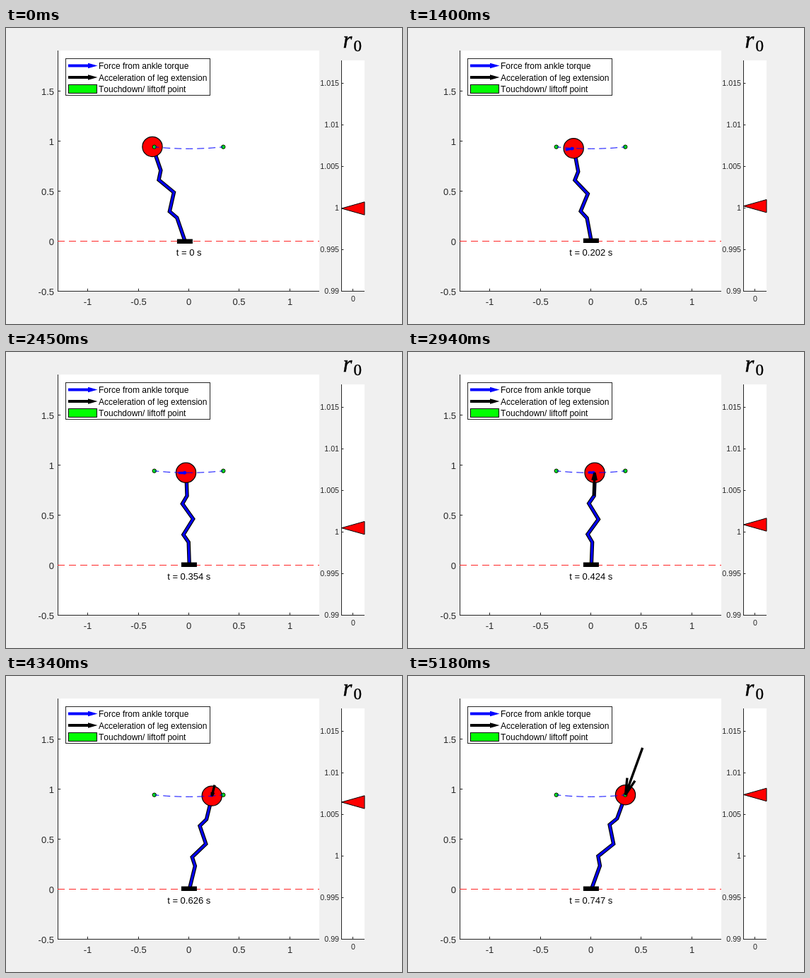
Animation of 560x420 px, one loop 5.25 s. Source, as an HTML page:

```html
<!DOCTYPE html>
<html lang="en">
<head>
<meta charset="utf-8">
<title>Leg stance simulation</title>
<style>
  html, body { margin: 0; width: 100%; height: 100%; overflow: hidden; background: #f0f0f0; }
  svg { display: block; width: 560px; height: 420px; font-family: "Liberation Sans", Arial, sans-serif; font-kerning: none; }
  .axis { stroke: #262626; fill: none; }
  .label { fill: #262626; font-size: 13px; }
  .small { fill: #262626; font-size: 10.67px; }
  .right { text-anchor: end; }
  .mid { text-anchor: middle; }
  .legend { font-size: 12px; }
  .math { font-family: "Liberation Serif", "Times New Roman", serif; stroke: #000; stroke-width: 0.4; }
  .dash { fill: none; stroke-dasharray: 10 6; }
  .arrow { fill: none; stroke-width: 3.4; stroke-linejoin: miter; }
  .leg { fill: none; stroke-linejoin: miter; }
</style>
</head>
<body>
<svg viewBox="0 0 560 420">
  <rect width="560" height="420" fill="#f0f0f0"/>
  <rect x="73" y="32" width="370" height="342" fill="#fff"/>
  <rect x="474" y="46" width="33" height="327" fill="#fff"/>
  <g id="axes"></g>

  <text class="math" x="476.5" y="28" font-size="33" font-style="italic">r</text>
  <text class="math" x="491.5" y="32.5" font-size="23">0</text>

  <path class="dash" d="M73 302.5H443" stroke="#ff2626"/>
  <path class="leg" id="legEdge" stroke="#000" stroke-width="5.4"/>
  <path class="leg" id="legCore" stroke="#00f" stroke-width="3"/>
  <rect id="foot" width="22" height="6.5"/>
  <circle id="mass" r="14.1" fill="#f00" stroke="#000" stroke-width="1.25"/>
  <g fill="#0f0" stroke="#000">
    <circle cx="209.8" cy="168.7" r="2.7"/>
    <circle cx="307.3" cy="168.7" r="2.7"/>
  </g>
  <path class="dash" d="M209.8 168.7Q258.5 173.9 307.3 168.7" stroke="#00f" stroke-dashoffset="3.5"/>
  <path class="arrow" id="force" stroke="#00f"/>
  <path class="arrow" id="accel" stroke="#000"/>
  <text class="mid" id="time" x="258.7" y="323" font-size="13"></text>

  <path id="pointer" fill="#f00" stroke="#000"/>

  <g class="legend">
    <rect x="84.5" y="43.5" width="204" height="52" fill="#fff" stroke="#262626"/>
    <path d="M88 53.5H120" stroke="#00f" stroke-width="4"/>
    <path d="M116 49.8L129.5 53.5L116 57.2Z" fill="#00f"/>
    <path d="M88 70H120" stroke="#000" stroke-width="4"/>
    <path d="M116 66.3L129.5 70L116 73.7Z"/>
    <rect x="88.5" y="80.5" width="40" height="12" fill="#0f0" stroke="#000"/>
    <text x="131" y="58">Force from ankle torque</text>
    <text x="131" y="74.5">Acceleration of leg extension</text>
    <text x="131" y="91">Touchdown/ liftoff point</text>
  </g>
</svg>
<script>
  const STEP = 70, STEPS = 75, GROUND = 302.8, PIVOT = 258.9;
  const $ = id => document.getElementById(id);
  const set = (id, attrs) => {
    for (const name in attrs) $(id).setAttribute(name, attrs[name]);
  };

  function buildAxes() {
    let out = "";
    const line = d => out += `<path class="axis" d="${d}"/>`;
    const text = (cls, x, y, s) => out += `<text class="${cls}" x="${x}" y="${y}">${s}</text>`;
    line("M73.5 32V373.5H443M474.5 46V373.5H507");
    for (let v = -1; v <= 1; v += 0.5) {
      const x = Math.floor(258.5 + v * 142.6) + 0.5;
      line(`M${x} 373V369.8`);
      text("label mid", x, 393, v);
    }
    for (let v = -0.5; v <= 1.5; v += 0.5) {
      const y = Math.floor(302.6 - v * 142.1) + 0.5;
      line(`M73 ${y}H77.2`);
      text("label right", 68, y + 5, v);
    }
    for (let i = 0; i < 6; i++) {
      const y = 373.5 - i * 59;
      line(`M474 ${y}H477.4`);
      text("small right", 471, y + 3.8, +(0.99 + i * 0.005).toFixed(3));
    }
    line("M490.5 373V370");
    text("small mid", 491, 387.5, 0);
    $("axes").innerHTML = out;
  }

  // Linear interpolation through [step, value] pairs.
  function track(k, keys) {
    for (let i = 1; i < keys.length; i++) {
      const [a, va] = keys[i - 1], [b, vb] = keys[i];
      if (k <= b) return va + (vb - va) * (k - a) / (b - a);
    }
    return keys[keys.length - 1][1];
  }

  // Arrow from (x + dx, y + dy) with its tip at (x, y).
  function arrow(x, y, dx, dy) {
    if (Math.hypot(dx, dy) < 0.5) return "";
    const barb = s => `${x + 0.33 * (dx + s * dy)} ${y + 0.33 * (dy - s * dx)}`;
    return `M${x + dx} ${y + dy}L${x} ${y}M${barb(0.25)}L${x} ${y}L${barb(-0.25)}`;
  }

  const forceKeys = [[0, 0], [3, 5], [12, 10.5], [27, 12.5], [42, 9], [54, 5], [62, 2], [70, 0]];
  const accelKeys = [[0, 0], [38, 0], [42, 33], [45, 0], [61, 0], [62, -16], [64, -49], [66, -71]];
  const lengthKeys = [[0, 256], [12, 254.2], [27, 251.3], [38, 249], [40, 248], [42, 245],
                      [44, 240], [54, 207], [62, 179]];
  const zigzag = [[0, 0], [1/4, 0], [1/3, -7], [1/2, 7.5], [2/3, -7], [3/4, 0], [1, 0]];

  function draw(k) {
    const x = 207 + 1.358 * k;
    const y = 171.3 - 2.6 * ((x - 258.5) / 48.8) ** 2;
    const footX = track(k, [[0, 252.9], [2.2, PIVOT]]);
    const dx = footX - x, dy = GROUND - y, len = Math.hypot(dx, dy);
    const ux = dx / len, uy = dy / len;

    const leg = "M" + zigzag.map(([f, n]) =>
      `${x + f * dx + (n + 0.4) * uy} ${y + f * dy - n * ux}`).join("L");
    set("legEdge", { d: leg });
    set("legCore", { d: leg });
    set("foot", { x: footX - 11, y: k < 2 ? 299.5 : 298.5 });
    set("mass", { cx: x, cy: y });

    const f = track(k, forceKeys), a = track(k, accelKeys);
    set("force", { d: arrow(x, y, -uy * f, ux * f) });
    set("accel", { d: arrow(x, y, ux * a, uy * a) });

    const py = k <= 62 ? track(k, lengthKeys) : 179 - 10.8 * (1 - Math.exp((62 - k) / 3.1));
    set("pointer", { d: `M474.5 ${py}L507 ${py - 9.2}V${py + 9.2}Z` });
    $("time").textContent = `t = ${+(k / 99).toPrecision(3)} s`;
  }

  buildAxes();
  draw(0);
  const start = performance.now();
  let shown = 0;
  function tick() {
    const k = Math.floor((performance.now() - start) / STEP) % STEPS;
    if (k !== shown) draw(shown = k);
    requestAnimationFrame(tick);
  }
  requestAnimationFrame(tick);
</script>
</body>
</html>
```
